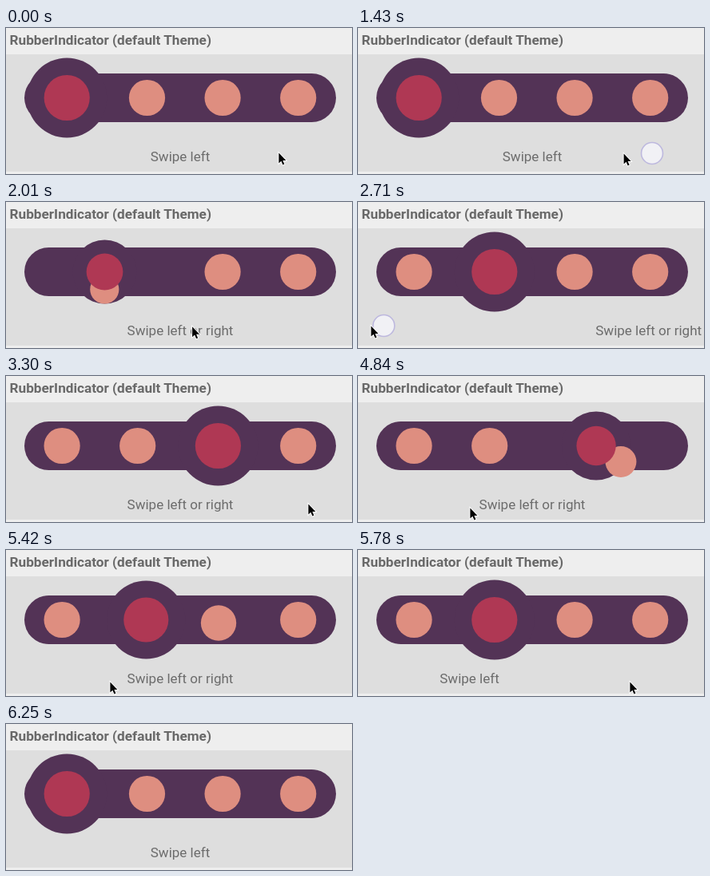
An HTML page that plays this animation: 433 by 183 pixels, repeating every 8.53 s.

```html
<!DOCTYPE html>
<html lang="en">
<head>
<meta charset="utf-8">
<title>RubberIndicator</title>
<style>
  html, body { margin: 0; width: 100%; height: 100%; overflow: hidden; background: #eee; }
  svg { display: block; }
  text { font: 17.05px Roboto, sans-serif; fill: #6c6c6c; }
  .title { font-weight: 700; font-size: 17.2px; fill: #696969; }
  .rubber { fill: #533356; }
  .small { fill: #de8e80; }
  .large { fill: #af3854; }
</style>
</head>
<body>
<svg width="433" height="183" viewBox="0 0 433 183">
  <rect width="433" height="183" fill="#eee"/>
  <rect y="33" width="433" height="147" fill="#dedede"/>
  <text class="title" x="4.6" y="21.4">RubberIndicator (default Theme)</text>
  <g id="pages"></g>
  <rect class="rubber" x="23" y="57" width="390" height="61" rx="30.5"/>
  <circle class="rubber" id="ring" cy="87.5"/>
  <g id="smalls"></g>
  <circle class="large" id="large" cy="87.5"/>
  <circle id="touch" r="13.5" fill="#f1f1f5" stroke="#bdb8de" stroke-width="1.6"/>
  <path id="cursor" d="M.4 .6V13.6L3.4 10.8 5.4 15.6 7.4 14.7 5.4 10H9.4Z"
        fill="#000" stroke="#fff" stroke-width="1.8" paint-order="stroke"/>
</svg>
<script>
const LOOP = 8530, STEP = 117.8; // the picture advances every STEP ms; times below count steps
const WIDTH = 433, PITCH = 94.6, JUMP = 106.4, HOP = 4, LAG = .4, HIDE = 53;

const swipes = [
  { press: 11.45, release: 14, from: 371, to: 20, y: 157, hop: 15 },
  { press: 20.2, release: 23, from: 345, to: 16, y: 155, hop: 24 },
  { press: 29.6, release: 31, from: 378, to: 95, y: 160, hop: 31 },
  { press: 37.4, release: 39.2, from: 142, to: 370, y: 150, hop: 38.6 },
  { press: 41.4, release: 43.4, from: 140, to: 370, y: 165, hop: 42.56 },
  { press: 46.4, release: 48.4, from: 130, to: 340, y: 165, hop: 49 }
];
// The cursor returns to 378 after the second swipe, where the third begins.

const $ = id => document.getElementById(id);
const clamp = v => Math.max(0, Math.min(1, v));
const ease = (n, start, end) => (1 - Math.cos(Math.PI * clamp((n - start) / (end - start)))) / 2;
const shrink = part => 1 - .4 * Math.min(part, 1 - part); // 1 at rest, .8 halfway

function set(el, attrs) {
  for (const key in attrs) el.setAttribute(key, attrs[key]);
}
function add(parent, tag, attrs, label = "") {
  const el = document.createElementNS("http://www.w3.org/2000/svg", tag);
  el.textContent = label;
  set(el, attrs);
  return $(parent).appendChild(el);
}

const pages = ["Swipe left", "Swipe left or right", "Swipe left or right", "Swipe right"]
  .map(label => add("pages", "text", { y: 167, "text-anchor": "middle" }, label));
const smalls = [0, 1, 2].map(() => add("smalls", "circle", { class: "small" }));

// Sums the page changes, each running over the time span given for its swipe.
const progress = (n, span) => swipes.reduce(
  (sum, s) => sum + Math.sign(s.from - s.to) * ease(n, ...span(s)), 0);

// Between swipes the cursor eases to the next starting point.
function cursorAt(n) {
  let x = 341, y = 156, rest = 1.5;
  for (const { press, release, from, to, y: level } of swipes) {
    const back = ease(n, rest, Math.min(rest + 5, press - LAG));
    x += (from - x) * back + (to - from) * ease(n, press, release);
    y += (level - y) * back;
    rest = release;
  }
  return { x, y };
}

function draw(n) {
  const page = progress(n, s => [s.press + .8, s.release + 1.3]);
  pages.forEach((el, i) => set(el, { x: 218 + WIDTH * (i - page) }));

  const pos = progress(n, s => [s.hop, s.hop + HOP]);
  const scale = shrink(clamp(pos - Math.floor(pos)));
  const cx = 76.2 + PITCH * pos;
  set($("ring"), { cx, r: 50 * scale });
  set($("large"), { cx, r: 28.6 * scale });
  smalls.forEach((el, i) => {
    const q = clamp(pos - i);
    set(el, { cx: 176.5 + PITCH * i - JUMP * q, cy: 87.5 + 88 * q * (1 - q), r: 22.6 * shrink(q) });
  });

  const tip = cursorAt(n), finger = cursorAt(n - LAG);
  const held = swipes.some(s => n >= s.press + LAG && n <= s.release);
  set($("cursor"), { transform: `translate(${tip.x} ${tip.y})`, visibility: n < HIDE ? "visible" : "hidden" });
  set($("touch"), { cx: finger.x, cy: finger.y, visibility: held ? "visible" : "hidden" });
}

function tick() {
  draw(Math.floor(performance.now() % LOOP / STEP));
  requestAnimationFrame(tick);
}
tick();
</script>
</body>
</html>
```
